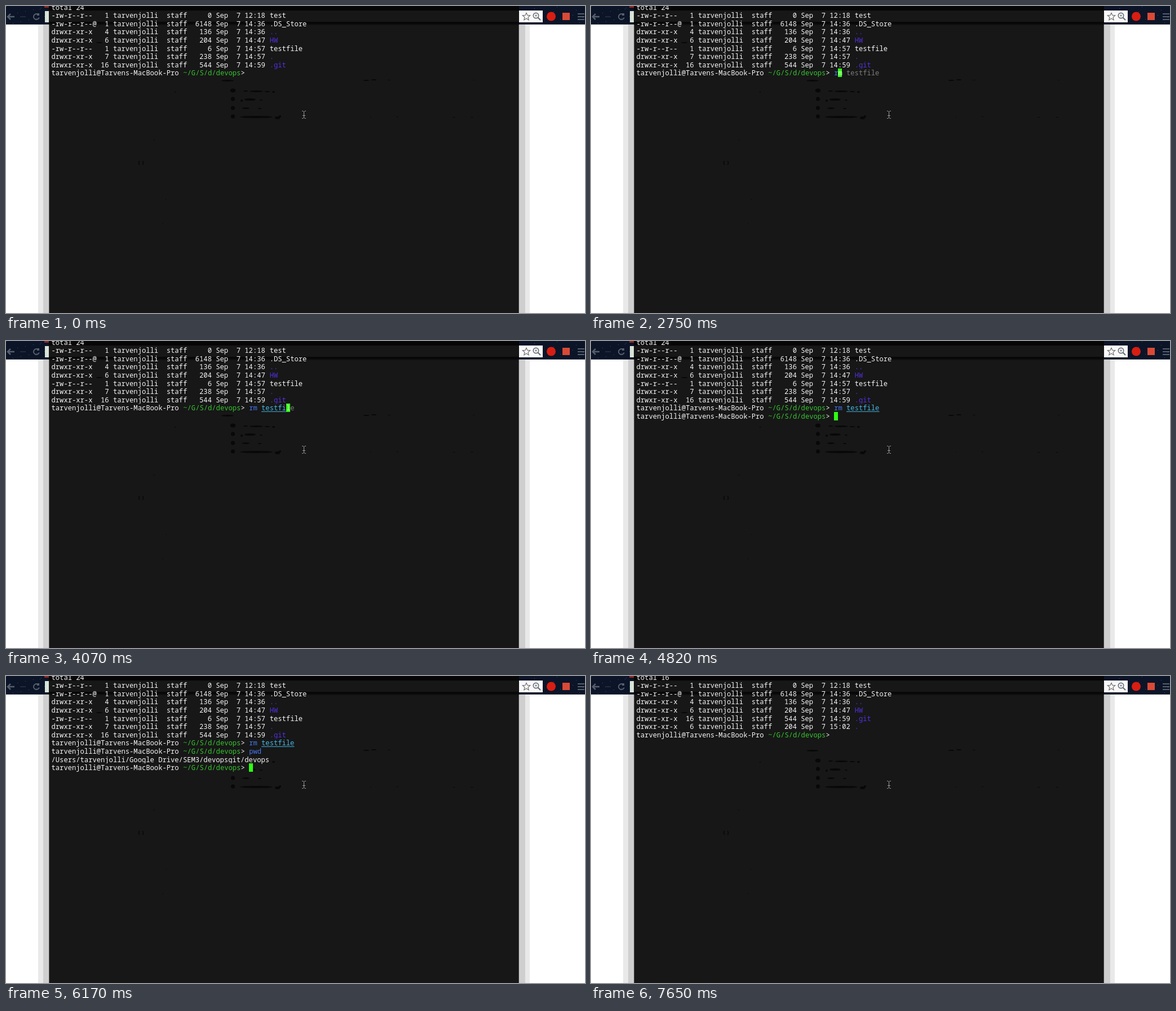
Write an HTML page with a canvas that moves like this. It is 1027x545 px and loops after 8000 ms.

```html
<!DOCTYPE html>
<html lang="en">
<head>
<meta charset="utf-8">
<title>Terminal session</title>
<style>
  html, body { margin: 0; width: 100%; height: 100%; overflow: hidden; background: #fff; }
  canvas { display: block; }
</style>
</head>
<body>
<canvas id="stage" width="1027" height="545"></canvas>
<script>
const ctx = document.getElementById("stage").getContext("2d");
const LOOP = 8000, LEFT = 80.5, TOP = -5.5, CELL = 7.305, ROW = 14.6;
const WHITE = "#f6f6f6", GREEN = "#35c52f", PURPLE = "#5430e2", BLUE = "#4478ee",
      CYAN = "#45b8e6", RED = "#ea4328", GHOST = "#7c7c7c", CURSOR = "#2efc12", TERM = "#171717";
const USER = "tarvenjolli", HOST = "Tarvens-MacBook-Pro";
const PROMPT = USER + "@" + HOST + " ", PATH = "~/G/S/d/devops";
const INPUT = PROMPT.length + PATH.length + 2;

// Time, screen, typed text, cursor hidden
const steps = [
  [0, 0, "", true], [150, 0, ""], [660, 0, "", true], [810, 0, "c"], [960, 0, "cl"], [1250, 0, ""],
  [2750, 0, "r"], [2900, 0, "rm"], [3040, 0, "rm "],
  ...[3340, 3490, 3630, 3780, 3920, 4070, 4220, 4370].map((t, i) => [t, 0, "rm testfile".slice(0, 4 + i)]),
  [4820, 1, ""], [5720, 1, "p"], [5870, 1, "pw"], [6020, 1, "pwd"],
  [6170, 2, ""], [6460, 2, "c"], [6760, 2, "cl"], [7050, 3, ""], [7650, 3, "", true]
];

const test = ["-rw-r--r--", 1, 0, "12:18", "test"],
      store = ["-rw-r--r--@", 1, 6148, "14:36", ".DS_Store"],
      parent = ["drwxr-xr-x", 4, 136, "14:36", ".."],
      hw = ["drwxr-xr-x", 6, 204, "14:47", "HW"],
      git = ["drwxr-xr-x", 16, 544, "14:59", ".git"];
const before = [test, store, parent, hw, ["-rw-r--r--", 1, 6, "14:57", "testfile"],
  ["drwxr-xr-x", 7, 238, "14:57", "."], git];
const after = [test, store, parent, hw, git, ["drwxr-xr-x", 6, 204, "15:02", "."]];

function rect(x, y, w, h, color) {
  ctx.fillStyle = color;
  ctx.fillRect(x, y, w, h);
}

function line(points, color, width = 1) {
  ctx.strokeStyle = color;
  ctx.lineWidth = width;
  ctx.beginPath();
  points.forEach(([x, y]) => ctx.lineTo(x, y));
  ctx.stroke();
}

function disc(x, y, rx, ry, color) {
  ctx.fillStyle = color;
  ctx.beginPath();
  ctx.ellipse(x, y, rx, ry, 0, 0, 7);
  ctx.fill();
}

function ring(x, y, r, color, width, from = 0, to = 7) {
  ctx.strokeStyle = color;
  ctx.lineWidth = width;
  ctx.beginPath();
  ctx.arc(x, y, r, from, to);
  ctx.stroke();
}

function put(row, col, text, color) {
  ctx.fillStyle = color;
  ctx.fillText(text, LEFT + col * CELL, TOP + row * ROW + 12);
}

function star(x, y, r) {
  const points = Array.from({ length: 11 }, (_, i) => {
    const a = i * Math.PI / 5 - Math.PI / 2, d = i % 2 ? r * 0.45 : r;
    return [x + d * Math.cos(a), y + d * Math.sin(a)];
  });
  line(points, "#747474", 1.2);
}

function drawBrowser() {
  rect(0, 0, 1027, 545, "#fff");
  rect(0, 0, 1027, 33, "#0c1428");
  rect(0, 32, 1027, 1, "#39404d");
  for (let i = 0; i < 26; i++)
    rect(i % 2 ? 912 + i * 37 % 114 : i * 31 % 76, i * 17 % 31, 1, 1, "#31517c");

  line([[15, 19], [3, 19]], "#56606c", 2.5);
  line([[8, 14], [3, 19], [8, 24]], "#56606c", 2.5);
  line([[25, 19], [35, 19]], "#222b39", 2);
  ring(54, 19, 5, "#56606c", 2, 0.3, 5.4);
  rect(55, 13, 4, 4, "#56606c");
  rect(68, 0, 9, 3, "#8d2924");
  rect(69, 9, 8, 20, "#d9e4d9");

  rect(905, 8, 47, 21, "#fafafa");
  star(923, 19, 7);
  ring(940, 17, 4.7, "#68717a", 1.7);
  line([[943.5, 20.5], [948, 25]], "#68717a", 2.3);
  line([[938, 17], [942, 17]], "#68717a");
  line([[940, 15], [940, 19]], "#68717a");
  disc(967, 18.5, 8, 8, "#d81e12");
  rect(987, 12, 13, 13, "#d94a36");
  [14, 19, 24].forEach(y => rect(1014, y - 1, 12, 2, "#56606c"));

  rect(57, 33, 9, 512, "#e9e9e9");
  rect(66, 33, 10, 512, "#cfcfcf");
  rect(910, 33, 11, 512, "#cfcfcf");
  rect(921, 33, 8, 512, "#e9e9e9");
}

function drawTerminal() {
  rect(76, 0, 834, 545, TERM);
  rect(76, 0, 834, 8, "#060606");
  rect(76, 28, 834, 4, "#080808");
  rect(76, 32, 834, 2, "#101010");
  rect(76, 33, 1, 512, "#555");
  rect(909, 33, 1, 512, "#444");

  // Page faintly visible through the window
  const dark = "#080808";
  [150, 165, 181, 196].forEach((y, i) => disc(402.5, y, i ? 3.5 : 4.8, 3.5, dark));
  [[382, 131, 22, 3], [421, 150, 8, 2], [432, 150, 24, 3], [459, 151, 9, 2], [472, 151, 5, 3],
   [416, 166, 4, 4], [423, 164, 20, 4], [450, 166, 5, 2], [419, 180, 13, 3], [447, 181, 6, 2],
   [415, 195, 58, 4], [477, 196, 9, 5], [484, 194, 4, 4],
   [634, 131, 10, 2], [648, 130, 9, 2], [677, 131, 5, 1], [828, 131, 3, 1],
   [646, 197, 2, 1], [692, 196, 4, 1], [792, 197, 5, 1], [824, 197, 5, 1],
   [299, 152, 2, 2], [261, 237, 3, 1], [283, 343, 2, 1], [277, 386, 2, 1], [160, 64, 11, 2]
  ].forEach(([x, y, w, h]) => disc(x + w / 2, y + h / 2, w / 2, h / 2, dark));
  ring(239, 278.5, 4.5, dark, 1.5, -0.8, 0.8);
  ring(240, 278.5, 4.5, dark, 1.5, 2.34, 3.94);
}

function drawListing(total, files) {
  put(0, 0, "total " + total, WHITE);
  files.forEach(([mode, links, size, time, name], i) => {
    const info = mode.padEnd(11) + String(links).padStart(3) + " " + USER + "  staff" +
      String(size).padStart(6) + " Sep  7 " + time + " ";
    put(i + 1, 0, info, WHITE);
    put(i + 1, info.length, name, mode[0] === "d" ? PURPLE : WHITE);
  });
}

function clearRow(row, cols) {
  rect(LEFT, TOP + row * ROW, cols * CELL, ROW, TERM);
}

function drawPrompt(row, typed, cursor) {
  const full = typed && ["rm testfile", "pwd"].find(s => s.startsWith(typed)) || typed;
  const command = typed.split(" ")[0], arg = typed.slice(3);
  const end = INPUT + typed.length;
  clearRow(row, INPUT + full.length);
  put(row, 0, PROMPT, WHITE);
  put(row, PROMPT.length, PATH, GREEN);
  put(row, INPUT - 2, ">", WHITE);
  put(row, INPUT, command, /^pw?$/.test(command) ? RED : BLUE);
  if (arg) {
    put(row, INPUT + 3, arg, CYAN);
    rect(LEFT + (INPUT + 3) * CELL, TOP + row * ROW + 13.5, arg.length * CELL, 1, CYAN);
  }
  put(row, end, full.slice(typed.length), GHOST);
  if (cursor) {
    rect(Math.round(LEFT + end * CELL), Math.round(TOP + row * ROW), 7, 15, CURSOR);
    put(row, end, full.charAt(typed.length), "#dcffd6");
  }
}

function drawPointer() {
  const c = "#999";
  line([[525, 186.5], [527, 186.5], [528.5, 188], [530, 186.5], [532, 186.5]], c);
  line([[528.5, 188], [528.5, 198]], c);
  line([[526, 194.5], [531, 194.5]], c);
  line([[525, 199.5], [527, 199.5], [528.5, 198], [530, 199.5], [532, 199.5]], c);
}

function draw(now) {
  const t = now % LOOP;
  const [, screen, typed, hidden] = steps.filter(s => s[0] <= t).pop();
  ctx.font = "500 12.175px 'Noto Sans Mono', 'DejaVu Sans Mono', monospace";
  drawBrowser();
  drawTerminal();
  if (screen === 3) drawListing(16, after);
  else drawListing(24, before);
  if (screen === 1 || screen === 2) drawPrompt(8, "rm testfile");
  if (screen === 2) {
    const output = "/Users/" + USER + "/Google Drive/SEM3/devopsgit/devops";
    drawPrompt(9, "pwd");
    clearRow(10, output.length);
    put(10, 0, output, WHITE);
  }
  drawPrompt([8, 9, 11, 7][screen], typed, !hidden);
  drawPointer();
}

const start = performance.now();
function tick() {
  draw(performance.now() - start);
  requestAnimationFrame(tick);
}
tick();
</script>
</body>
</html>
```
